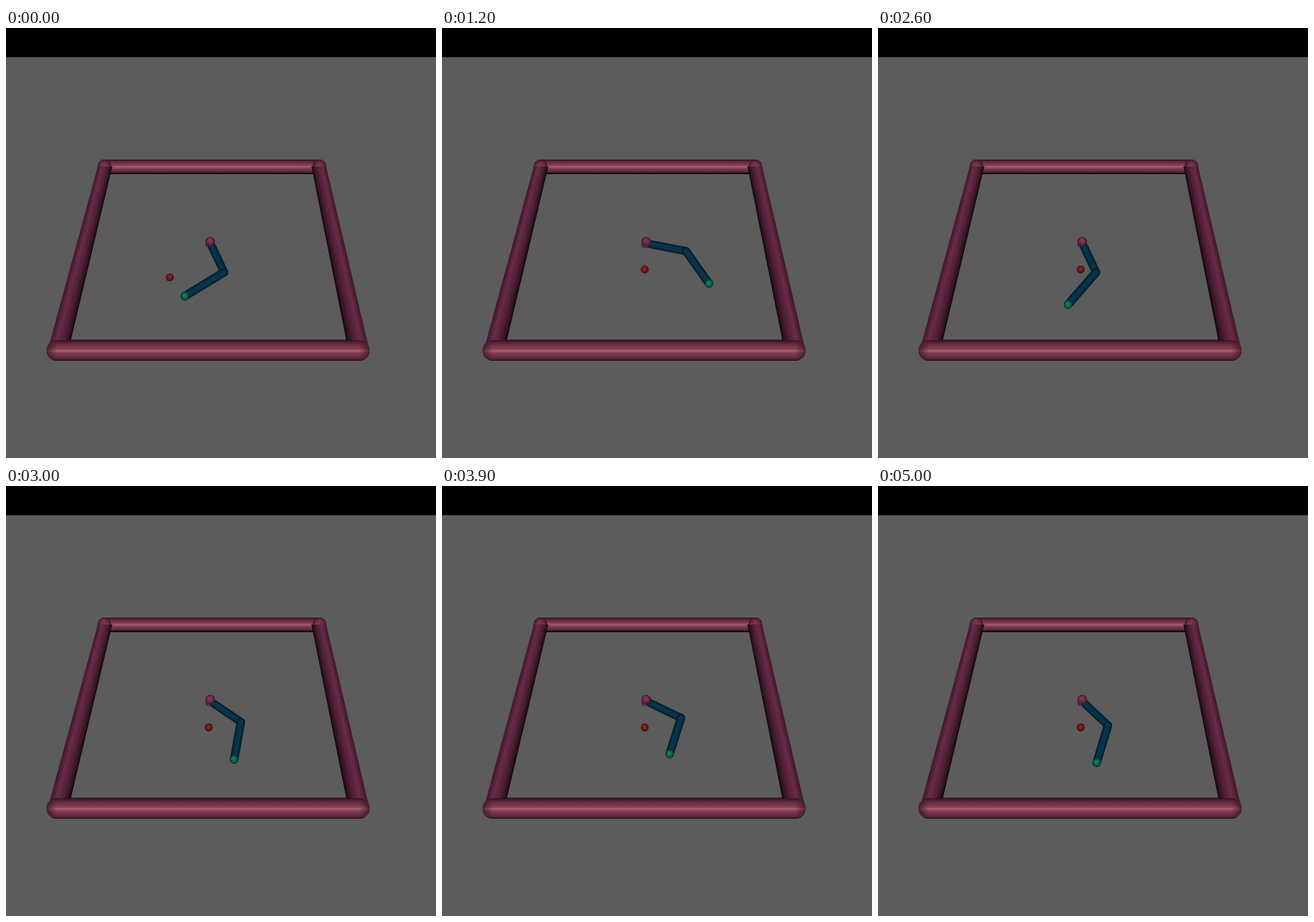
Recreate the animation shown at these times as an HTML page with a canvas. Size 500 by 500 pixels, loop 5100 ms.

```html
<!DOCTYPE html>
<html lang="en">
<head>
<meta charset="utf-8">
<title>Two-link reacher</title>
<style>
html, body { margin: 0; width: 100%; height: 100%; overflow: hidden; background: #000; }
canvas { display: block; width: 500px; height: 500px; }
</style>
</head>
<body>
<canvas id="stage" width="500" height="500"></canvas>
<script>
const ctx = document.getElementById('stage').getContext('2d');
const LOOP = 5100, STEP = 100, UPPER = 0.097, LOWER = 0.11;

// time in ms, then the absolute angles of both links in degrees
const poses = [
  [100, -1, 1],
  [1200, -15, -64.5],
  [1800, -30.5, -100.6],
  [2600, -70.7, -123.5],
  [3400, -15, -75],
  [4300, -48.5, -126.3],
  [5000, -52.2, -103.9]
];
const restPose = [-70.7, -141.5];

// Slope at a key; flat at turning points and at both ends
function slope(i, k) {
  if (i === 0 || i === poses.length - 1) return 0;
  const [p, q, r] = [poses[i - 1], poses[i], poses[i + 1]];
  const s = (q[k] - p[k]) / (q[0] - p[0]), e = (r[k] - q[k]) / (r[0] - q[0]);
  return s * e <= 0 ? 0 : 2 * s * e / (s + e);
}

function angle(t, k) {
  if (t < poses[0][0]) return restPose[k - 1];
  let i = 0;
  while (i < poses.length - 2 && t > poses[i + 1][0]) i++;
  const a = poses[i], b = poses[i + 1], d = b[0] - a[0], u = (t - a[0]) / d;
  const u2 = u * u, u3 = u2 * u;
  return (2 * u3 - 3 * u2 + 1) * a[k] + (u3 - 2 * u2 + u) * d * slope(i, k) +
    (3 * u2 - 2 * u3) * b[k] + (u3 - u2) * d * slope(i + 1, k);
}

// Floor coordinates to screen; w is the arena's width in pixels at that depth
function project(x, y) {
  const w = 1 / (0.0034407 + y / 0.3 * 0.000575);
  return { x: 239.5 - (w - 249) * 0.04 + x / 0.6 * w, y: 161 + (w - 249) * 2.15, w };
}

function reach(from, length, deg) {
  const r = deg * Math.PI / 180;
  return [from[0] + length * Math.cos(r), from[1] + length * Math.sin(r)];
}

function linear(x0, y0, x1, y1, stops) {
  const g = ctx.createLinearGradient(x0, y0, x1, y1);
  stops.forEach(([at, c]) => g.addColorStop(at, c));
  return g;
}

function ball(x, y, r, light, mid, dark) {
  const g = ctx.createRadialGradient(x - r * 0.1, y - r * 0.2, 0, x, y, r);
  g.addColorStop(0, light);
  g.addColorStop(0.55, mid);
  g.addColorStop(1, dark);
  ctx.fillStyle = g;
  ctx.beginPath();
  ctx.arc(x, y, r, 0, 7);
  ctx.fill();
}

function bar(x, y, w, h) {
  ctx.beginPath();
  ctx.roundRect(x, y, w, h, h / 2);
  ctx.fillStyle = linear(0, y, 0, y + h, [
    [0, '#2c111f'], [0.14, '#5c263c'], [0.42, '#853f55'], [0.52, '#a66066'],
    [0.62, '#853f55'], [0.88, '#5c263c'], [1, '#2c111f']
  ]);
  ctx.fill();
  // The round ends turn away from the light
  const cap = h / 2 / w, clear = 'rgba(50,18,34,0)', shade = 'rgba(50,18,34,.75)';
  ctx.fillStyle = linear(x, 0, x + w, 0, [[0, shade], [cap, clear], [1 - cap, clear], [1, shade]]);
  ctx.fill();
}

// Drawn in thin rows so that the tube's tones follow its taper
function sideWall(outerTop, outerLow, innerTop, innerLow) {
  const top = 161, low = 376;
  for (let y = top; y < low; y++) {
    const u = (y - top) / (low - top);
    const x0 = outerTop + (outerLow - outerTop) * u;
    const x1 = innerTop + (innerLow - innerTop) * u;
    ctx.fillStyle = linear(x0, 0, x1, 0, [
      [0, '#3d1728'], [0.3, '#692b46'], [0.65, '#4f1f35'], [0.88, '#30121f'], [1, '#0c0407']
    ]);
    ctx.fillRect(Math.min(x0, x1), y, Math.abs(x1 - x0), 1);
  }
}

function arena() {
  ctx.fillStyle = '#5c5c5c';
  ctx.fillRect(0, 34, 500, 466);
  ctx.fillStyle = '#000';
  ctx.fillRect(0, 0, 500, 34);
  bar(107, 153, 265, 16);
  ctx.fillStyle = '#150a0f';
  ctx.fillRect(121, 168.5, 237, 1.5);
  ball(114.5, 161, 8, '#7c384f', '#6a2d45', '#3d1728');
  ball(364.5, 161, 8, '#7c384f', '#6a2d45', '#3d1728');
  sideWall(106.6, 48, 123.5, 72.2);
  sideWall(372.4, 423, 355.3, 398.4);
  ctx.fillStyle = '#150a0f';
  ctx.fillRect(75, 362.5, 321, 1.5);
  bar(47, 363, 376, 24);
}

function link(a, b) {
  const p = project(...a), q = project(...b), width = (p.w + q.w) / 63;
  ctx.lineCap = 'round';
  [[1, '#041b28'], [0.76, '#062a3c'], [0.45, '#08354d']].forEach(([k, color]) => {
    ctx.strokeStyle = color;
    ctx.lineWidth = width * k;
    ctx.beginPath();
    ctx.moveTo(p.x, p.y);
    ctx.lineTo(q.x, q.y);
    ctx.stroke();
  });
}

function draw(t) {
  const a = angle(t, 1), b = angle(t, 2);
  const elbow = reach([0, 0], UPPER, a), tip = reach(elbow, LOWER, b);
  const end = project(...tip), target = t < STEP ? [190.5, 290] : [235.7, 280.8];
  ctx.drawImage(backdrop, 0, 0);
  ctx.fillStyle = linear(232, 0, 243, 0, [[0, '#4a1b31'], [0.45, '#6f2e49'], [1, '#3a1526']]);
  ctx.beginPath();
  ctx.roundRect(232, 244, 11, 12, 4);
  ctx.fill();
  ball(...target, 4.6, '#8d2a2a', '#711c1c', '#350c0c');
  link(reach([0, 0], 0.012, a), elbow);
  link(elbow, tip);
  ball(end.x, end.y, 5, '#158a68', '#0b6650', '#043629');
  ball(237.4, 248, 5.3, '#863a56', '#702c4b', '#45192e');
}

arena();
const backdrop = document.createElement('canvas');
backdrop.width = backdrop.height = 500;
backdrop.getContext('2d').drawImage(ctx.canvas, 0, 0);

const start = performance.now();
function tick() {
  const t = (performance.now() - start) % LOOP;
  draw(Math.floor(t / STEP) * STEP);
  requestAnimationFrame(tick);
}
tick();
</script>
</body>
</html>
```
